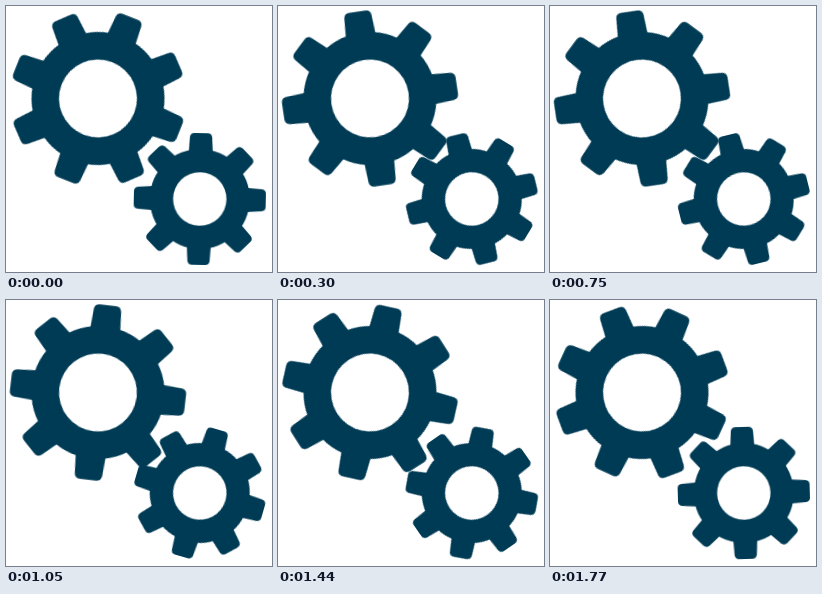
Write an HTML page that moves like this. It is 266x266 px and loops after 1.8 s.

```html
<!DOCTYPE html>
<html lang="en">
<head>
<meta charset="utf-8">
<title>Gears</title>
<style>
  html, body { margin: 0; width: 100%; height: 100%; overflow: hidden; background: #fff; }
  svg { display: block; width: 100vw; height: 100vh; }
  g { transform-origin: 0 0; }
</style>
</head>
<body>
<svg viewBox="0 0 266 266" fill="#003b55">
  <g id="big"></g>
  <g id="small"></g>
</svg>
<script>
const NS = "http://www.w3.org/2000/svg";
const LOOP = 1800, STEPS = 60, TURN = 180, TEETH = 8;

const gears = [
  { id: "big", x: 92, y: 92.5, body: 66.5, hole: 39, tip: 87.8, top: 13.1, foot: 15.2, round: 5, start: 21.6, dir: -1 },
  { id: "small", x: 193.8, y: 193, body: 50, hole: 26.7, tip: 66, top: 10.5, foot: 12.2, round: 4, start: 1.2, dir: 1 }
];

function add(parent, attrs) {
  const el = document.createElementNS(NS, "path");
  for (const key in attrs) el.setAttribute(key, attrs[key]);
  parent.append(el);
}

function circle(r) {
  return `M${r} 0A${r} ${r} 0 1 1 ${-r} 0A${r} ${r} 0 1 1 ${r} 0Z`;
}

// One tooth pointing up, with rounded outer corners.
function tooth({ body, tip, top, foot, round }) {
  const base = body - 6, side = top + 0.6, low = tip - round;
  return `M${-foot} ${-base}L${-side} ${-low}Q${-top} ${-tip} ${round - top} ${-tip}` +
    `H${top - round}Q${top} ${-tip} ${side} ${-low}L${foot} ${-base}Z`;
}

function spin(el, { x, y, start, dir }) {
  const pose = angle => ({ transform: `translate(${x}px, ${y}px) rotate(${angle}deg)` });
  const motion = el.animate([pose(start), pose(start + dir * TURN)], {
    duration: LOOP, iterations: Infinity, easing: `steps(${STEPS}, end)`
  });
  motion.startTime = document.timeline.currentTime;
}

for (const gear of gears) {
  const el = document.getElementById(gear.id);
  add(el, { d: circle(gear.body) + circle(gear.hole), "fill-rule": "evenodd" });
  for (let i = 0; i < TEETH; i++) {
    add(el, { d: tooth(gear), transform: `rotate(${i * 360 / TEETH})` });
  }
  spin(el, gear);
}
</script>
</body>
</html>
```
